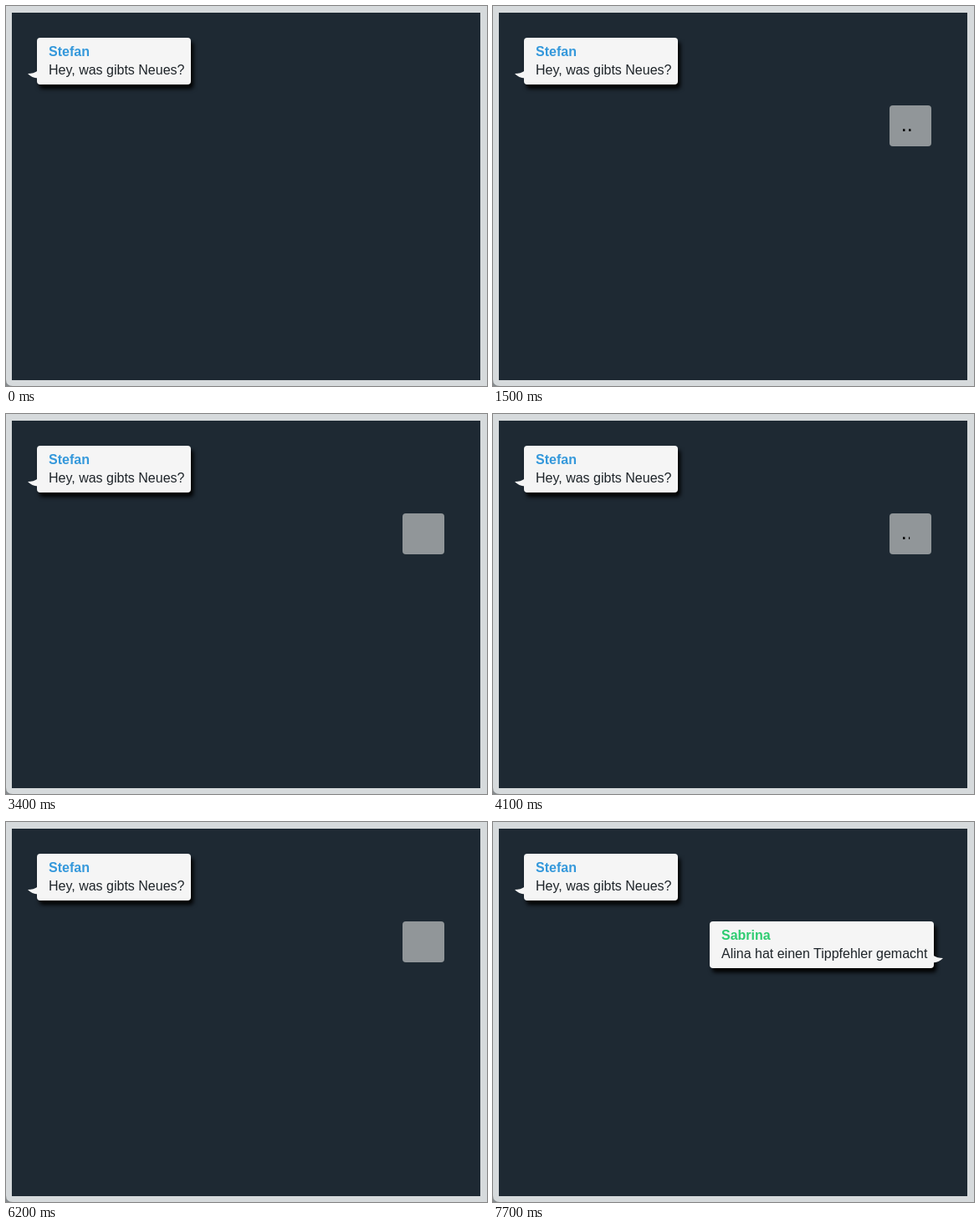
An HTML page for the animation above (8000 ms loop, 575 by 455 pixels).

```html
<!DOCTYPE html>
<html lang="de">
<head>
<meta charset="utf-8">
<title>Chat</title>
<style>
  html, body { margin: 0; width: 100%; height: 100%; overflow: hidden; background: #1e2933; }
  svg { display: block; width: 575px; height: 455px; }
  text { font: 16px "Liberation Sans", Arial, sans-serif; fill: #1e2429; }
  .name { font-weight: bold; }
  .dots { font-size: 25.2px; fill: #000; }
  .bubble { fill: #f5f5f5; }
</style>
</head>
<body>
<svg viewBox="0 0 575 455">
  <defs>
    <filter id="shadow" x="-20" y="-20" width="320" height="120" filterUnits="userSpaceOnUse" color-interpolation-filters="sRGB">
      <feDropShadow dx="3" dy="5" stdDeviation="2.7" flood-color="#000"/>
    </filter>
    <clipPath id="reveal"><rect id="window" x="480" y="119" width="0" height="49"/></clipPath>
    <path id="tail" class="bubble" d="M1 39.5Q-4 43 -11 43Q-6 48.3 1 48.5Z"/>
  </defs>

  <rect width="575" height="455" fill="#858a8d"/>
  <path d="M0 0H575V455H8Q0 455 0 447Z" fill="#d6dadc"/>
  <rect x="7" y="8" width="560" height="440" fill="#1e2933"/>

  <g transform="translate(37 38)">
    <rect class="bubble" width="184" height="56" rx="4" filter="url(#shadow)"/>
    <use href="#tail"/>
    <text class="name" x="14" y="22" style="fill:#3498db">Stefan</text>
    <text x="14" y="44">Hey, was gibts Neues?</text>
  </g>

  <g id="typing">
    <rect x="474" y="119" width="50" height="49" rx="4" fill="#919699"/>
    <g clip-path="url(#reveal)">
      <text class="dots" x="487.7 494.7 501.7" y="150">...</text>
    </g>
  </g>

  <g id="reply" transform="translate(259 119)">
    <rect class="bubble" width="268" height="56" rx="4" filter="url(#shadow)"/>
    <use href="#tail" transform="translate(268 1) scale(-1 1)"/>
    <text class="name" x="14" y="22" style="fill:#2ecc71">Sabrina</text>
    <text x="14" y="44">Alina hat einen Tippfehler gemacht</text>
  </g>
</svg>
<script>
  const LOOP = 8000, TICK = 100;
  const TYPING_AT = 500, REPLY_AT = 7700;
  const CYCLE = 1375, CYCLE_START = 640;
  const DOTS_LEFT = 487.4, SPEED = 0.01515; // px, px per ms

  const typing = document.getElementById("typing");
  const reply = document.getElementById("reply");
  const reveal = document.getElementById("window");

  const show = (el, on) => el.setAttribute("visibility", on ? "visible" : "hidden");

  function draw(time) {
    const t = Math.floor((time % LOOP) / TICK) * TICK;
    show(typing, t >= TYPING_AT && t < REPLY_AT);
    show(reply, t >= REPLY_AT);

    // The dots are wiped in from the left at a steady speed, then start over.
    const phase = (t - CYCLE_START + CYCLE) % CYCLE;
    const edge = DOTS_LEFT + phase * SPEED;
    reveal.setAttribute("width", edge - 480);
  }

  function loop(now) {
    draw(now);
    requestAnimationFrame(loop);
  }
  draw(0);
  requestAnimationFrame(loop);
</script>
</body>
</html>
```
